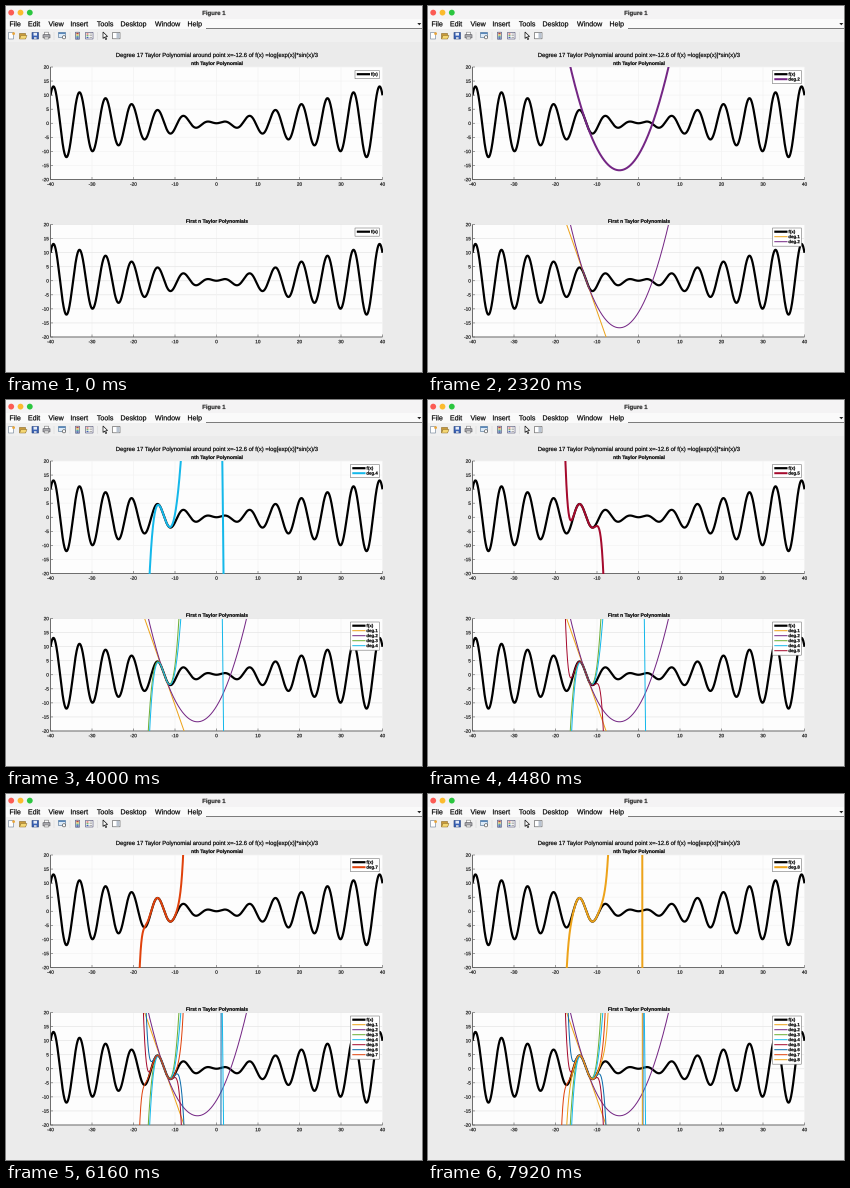
A matplotlib script that plays this animation: 416 px wide and 366 px high, repeating every 8 s.

```python
import math

import matplotlib.pyplot as plt
import numpy as np
from matplotlib.animation import FuncAnimation
from matplotlib.patches import Circle, PathPatch, Polygon, Rectangle
from matplotlib.textpath import TextPath
from matplotlib.transforms import Affine2D

W, H, DPI = 416, 366, 100
FRAME_MS, FRAMES = 80, 100
CENTER = -12.6
STARTS = [720, 1520, 2400, 3280, 4240, 5200, 6160, 7200]  # ms at which each degree appears
COLORS = ["#eda31a", "#742684", "#6cae36", "#14b8ea",
          "#a50a2d", "#0b6cab", "#e0420c", "#eda31a"]
LEFT, WIDTH, HEIGHT = 44.5, 332, 112.5
TOPS = (61, 218.5)
BLACK_LW, SINGLE_LW, STACKED_LW = 2.2, 2, 1

plt.rcParams["path.snap"] = False


def pt(px):
    return px * 72 / DPI


def pixel_axes(zorder):
    ax = fig.add_axes([0, 0, 1, 1], zorder=zorder)
    ax.set(xlim=(0, W), ylim=(H, 0))
    ax.axis("off")
    return ax


def rect(ax, x, y, w, h, fill, edge="none", lw=0.6, z=1):
    return ax.add_patch(Rectangle((x, y), w, h, fc=fill, ec=edge, lw=pt(lw), zorder=z))


def line(ax, xs, ys, color, lw=0.7, z=2):
    return ax.plot(xs, ys, color=color, lw=pt(lw), zorder=z, solid_capstyle="butt")[0]


def text(ax, x, y, s, size, align=0, color="#000000", weight="normal"):
    """Draw text as outlines on baseline y; align is 0 left, 0.5 centre, 1 right."""
    path = TextPath((0, 0), s, size=size,
                    prop={"family": "Liberation Sans", "weight": weight})
    box = path.get_extents()
    place = Affine2D().translate(-box.x0 - align * box.width, 0).scale(1, -1).translate(x, y)
    return ax.add_patch(PathPatch(place.transform_path(path), fc=color, ec=color,
                                  lw=pt(0.18), zorder=4))


def f(x):
    return x * np.sin(x) / 3


def derivative(n):
    c = CENTER
    return (c * math.sin(c + n * math.pi / 2) + n * math.sin(c + (n - 1) * math.pi / 2)) / 3


def taylor(x, degree):
    t = x - CENTER
    total = sum(derivative(n) / math.factorial(n) * t**n for n in range(degree + 1))
    return np.clip(total, -300, 300)


def draw_window(ax):
    rect(ax, 0, 0, W, H, "#ebebeb")
    rect(ax, 0, 0, W, 13, "#f4f3f4")
    rect(ax, 0, 13, W, 10, "#fafafa")
    rect(ax, 0, 23, W, 13, "#f0f0f0")
    for x, color in ((5.2, "#fc5b54"), (14.5, "#fcbb2d"), (23.8, "#2bc63f")):
        ax.add_patch(Circle((x, 6.6), 2.9, fc=color, ec="none"))
    text(ax, 208, 9, "Figure 1", 6, 0.5, "#2a2a2a", "bold")
    menu = zip((4, 22.5, 42.5, 65, 91, 115, 149, 182),
               ("File", "Edit", "View", "Insert", "Tools", "Desktop", "Window", "Help"))
    for x, name in menu:
        text(ax, x, 20.3, name, 7.1)
    line(ax, [200, W], [22.5, 22.5], "#6e6e6e", 0.9)
    ax.add_patch(Polygon([(411.3, 17), (415.3, 17), (413.3, 19.3)], fc="#222222", ec="none"))


def draw_toolbar(ax):
    for x in (48, 64, 91.5):
        line(ax, [x, x], [26, 34], "#dedede")
    # new, open, save
    rect(ax, 2.5, 26.5, 5, 6.5, "#ffffff", "#6d7f94")
    ax.add_patch(Circle((7.6, 27.6), 1.4, fc="#e9a53a", ec="none", zorder=3))
    rect(ax, 13.5, 27.5, 6, 5, "#c99b3c", "#8d6c2a")
    ax.add_patch(Polygon([(13.5, 33), (15, 29.5), (21, 29.5), (19.5, 33)],
                         fc="#f4d774", ec="#8d6c2a", lw=pt(0.5), zorder=3))
    rect(ax, 26, 26.5, 6.5, 6.5, "#3a62b4", "#27437e")
    rect(ax, 27.5, 26.8, 3.5, 2.8, "#e6ecf7", z=3)
    rect(ax, 28, 31, 2.6, 2, "#c2cbdd", z=3)
    # print, preview
    rect(ax, 38.5, 26.2, 4, 3, "#ffffff", "#777777")
    rect(ax, 37, 28.7, 7, 3.2, "#a9a9ae", "#55555a")
    rect(ax, 38.5, 31, 4, 2, "#f5f5f5", "#777777", z=3)
    rect(ax, 52.5, 26.5, 7, 5, "#dceaf7", "#4d6f91")
    rect(ax, 52.5, 26.5, 7, 1.4, "#4d7fb5", z=3)
    ax.add_patch(Circle((58, 31.3), 1.6, fc="#ffffff", ec="#444444", lw=pt(0.6), zorder=3))
    # colour bar, legend
    rect(ax, 69.5, 26.2, 4, 7, "#ffffff", "#39456b")
    for k, color in enumerate(("#b8473f", "#d9c057", "#58a8a5", "#3b53a4")):
        rect(ax, 70.3, 26.8 + 1.5 * k, 2.4, 1.5, color, z=3)
    rect(ax, 79.5, 26.4, 7.5, 6.6, "#ffffff", "#4b4b70")
    for k, color in enumerate(("#c8443b", "#4a9a4a", "#3c59b0")):
        line(ax, [80.5, 82.5], [28 + 1.8 * k] * 2, color, 1.1, 3)
        line(ax, [83.5, 86], [28 + 1.8 * k] * 2, "#777777", 0.6, 3)
    # pointer, inspector
    ax.add_patch(Polygon([(97, 26), (97, 32.5), (98.6, 31), (99.7, 33.6), (100.7, 33.1),
                          (99.6, 30.7), (101.6, 30.5)], fc="#ffffff", ec="#111111",
                         lw=pt(0.7), zorder=3))
    rect(ax, 106.5, 26.5, 7.5, 6.3, "#ffffff", "#555555")
    rect(ax, 110.5, 27, 3, 5.3, "#b9c3d0", z=3)


def draw_plot_frame(ax, top, row_color):
    bottom, right = top + HEIGHT, LEFT + WIDTH
    rect(ax, LEFT, top, WIDTH, HEIGHT, "#fdfdfd")
    for k in range(9):
        x, y = LEFT + WIDTH * k / 8, bottom - HEIGHT * k / 8
        line(ax, [x, x], [top, bottom], "#f2f2f2")
        line(ax, [LEFT, right], [y, y], row_color)
        line(ax, [x, x], [bottom - 2.5, bottom], "#606060", 0.6, 3)
        line(ax, [LEFT, LEFT + 2.5], [y, y], "#606060", 0.6, 3)
        text(ax, x, bottom + 6.2, str(10 * k - 40), 4.7, 0.5, "#1c1c1c")
        text(ax, LEFT - 1.8, y + 1.7, str(5 * k - 20), 4.7, 1, "#1c1c1c")
    line(ax, [LEFT, LEFT, right], [top, bottom, bottom], "#606060", 0.9, 3)


def legend(ax, top, entries):
    """Draw a legend box; entries are (label, color, line width)."""
    x = 349 if len(entries) == 1 else 344.5
    parts = [rect(ax, x, top + 3.5, 373.3 - x, 3.2 + 5 * len(entries), "#ffffff", "#7c7c7c")]
    for k, (label, color, lw) in enumerate(entries):
        y = top + 7.2 + 5 * k
        parts.append(line(ax, [x + 1.8, x + 15], [y, y], color, lw))
        parts.append(text(ax, x + 16, y + 1.4, label, 4.4, weight="bold"))
    return parts


fig = plt.figure(figsize=(W / DPI, H / DPI), dpi=DPI, facecolor="#ebebeb")
back = pixel_axes(0)
front = pixel_axes(3)
draw_window(back)
draw_toolbar(back)
text(back, 211, 51, "Degree 17 Taylor Polynomial around point x=-12.6 of "
     "f(x) =log[exp(x)]*sin(x)/3", 5.9, 0.5)
text(back, 211, 59, "nth Taylor Polynomial", 5, 0.5, weight="bold")
text(back, 211, 216.8, "First n Taylor Polynomials", 5, 0.5, weight="bold")

x = np.linspace(-40, 40, 3000)
plots = []
for top, row_color in zip(TOPS, ("#f4f4f4", "#e6e6e6")):
    draw_plot_frame(back, top, row_color)
    ax = fig.add_axes([LEFT / W, 1 - (top + HEIGHT) / H, WIDTH / W, HEIGHT / H], zorder=2)
    ax.set(xlim=(-40, 40), ylim=(-20, 20))
    ax.axis("off")
    line(ax, x, f(x), "#000000", BLACK_LW)
    plots.append(ax)

single, stacked, legends = [], [], []
for n in range(len(STARTS) + 1):
    base = [("f(x)", "#000000", BLACK_LW)]
    labels = [(f"deg.{k + 1}", COLORS[k], STACKED_LW) for k in range(n)]
    current = [(label, color, SINGLE_LW) for label, color, _ in labels[-1:]]
    legends.append(legend(front, TOPS[0], base + current)
                   + legend(front, TOPS[1], base + labels))
    if n:
        y = taylor(x, n)
        single.append(line(plots[0], x, y, COLORS[n - 1], SINGLE_LW, 3))
        stacked.append(line(plots[1], x, y, COLORS[n - 1], STACKED_LW, 3))


def update(frame):
    degree = sum(start <= frame * FRAME_MS for start in STARTS)
    for n, parts in enumerate(legends):
        for part in parts:
            part.set_visible(n == degree)
    for n, (only, kept) in enumerate(zip(single, stacked), 1):
        only.set_visible(n == degree)
        kept.set_visible(n <= degree)
    return []


anim = FuncAnimation(fig, update, frames=FRAMES, interval=FRAME_MS,
                     repeat=True, repeat_delay=0, blit=False)
plt.show()
```
